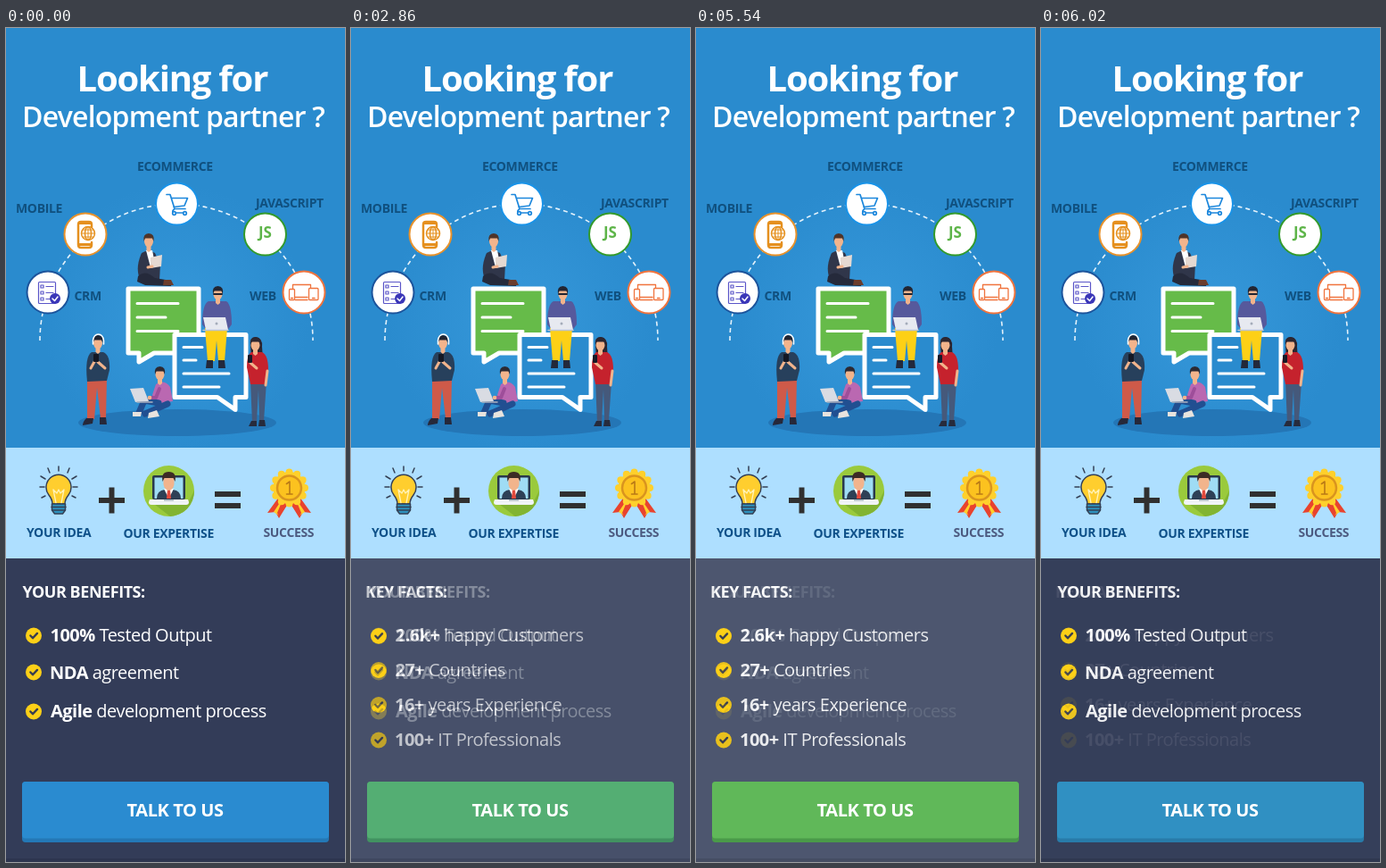
An HTML page that plays this animation: 380 by 934 pixels, repeating every 6080 ms.

```html
<!DOCTYPE html>
<html lang="en">
<head>
<meta charset="utf-8">
<title>Development partner</title>
<style>
  html, body { margin: 0; width: 100%; height: 100%; overflow: hidden; background: #2a8bce; }
  svg { display: block; width: 100vw; height: 100vh; font-family: "Open Sans", sans-serif; font-weight: 700; }
  .title { font-size: 40px; letter-spacing: -.03em; fill: #fff; }
  .subtitle { font-size: 32px; font-weight: 600; letter-spacing: -.025em; fill: #fff; }
  .label { font-size: 14px; letter-spacing: -.35px; fill: #10507f; }
  .sum { font-size: 14px; letter-spacing: -.35px; fill: #0f5189; }
  .heading { font-size: 18px; letter-spacing: -.45px; fill: #fff; }
  .item { font-size: 20px; font-weight: 400; letter-spacing: -.5px; fill: #fff; }
  .item tspan { font-weight: 700; }
  .button { font-size: 20px; letter-spacing: -.4px; fill: #fff; }
  .line { fill: none; stroke-linecap: round; stroke-linejoin: round; }
  .badge { fill: #fff; stroke-width: 2; }
  .skin { fill: #f2b48c; }
  .arm { stroke: #f2b48c; stroke-width: 3; }

  /* Crossfade in 60 ms steps of a tenth, both ways */
  #facts { animation: swap 6080ms infinite; }
  @keyframes swap {
    0% { opacity: 0; animation-timing-function: step-end; }
    41.1184% { opacity: .1; animation-timing-function: steps(9, end); }
    50% { opacity: 1; animation-timing-function: step-end; }
    91.1184% { opacity: .9; animation-timing-function: steps(9, end); }
    100% { opacity: 0; }
  }
</style>
</head>
<body>
<svg viewBox="0 0 380 934" preserveAspectRatio="none">
  <defs>
    <radialGradient id="glow" gradientUnits="userSpaceOnUse" cx="190" cy="325" r="150">
      <stop offset="0" stop-color="#3698da"/>
      <stop offset="1" stop-color="#2a8bce"/>
    </radialGradient>
    <g id="tick">
      <circle r="9" fill="#fdd017"/>
      <path class="line" d="M-3.6 0 -1 2.8 4-2.6" stroke="#3a3f50" stroke-width="2.4"/>
    </g>
    <g id="head">
      <path class="skin" d="M-2.5 3h5v7l-2.500 2-2.500-2Z"/>
      <ellipse class="skin" rx="5" ry="6.500"/>
      <path d="M-5.500 0Q-7-8.500 0-9 7-8.500 5.500 0L4-3.500H-4Z" fill="currentColor"/>
    </g>
    <g id="ribbon">
      <path d="M306 525 293 543 302 542 306 549 317 531Z" fill="#e8432e"/>
      <path d="M308 530 300 542 306 546 314 533Z" fill="#ffd02c"/>
      <path d="M309 531 304 543 306 547 316 533Z" fill="#e8432e"/>
    </g>
  </defs>

  <rect width="380" height="470" fill="url(#glow)"/>
  <text class="title" x="79.500" y="71">Looking for</text>
  <text class="subtitle" x="18" y="111">Development partner ?</text>

  <!-- Services -->
  <path d="M38 350A153 153 0 0 1 344 350" fill="none" stroke="#e4f2fb" stroke-width="1.6" stroke-dasharray="5 4"/>
  <g class="label">
    <text x="147" y="160">ECOMMERCE</text>
    <text x="11" y="207">MOBILE</text>
    <text x="280" y="201">JAVASCRIPT</text>
    <text x="76.500" y="305">CRM</text>
    <text x="273" y="305">WEB</text>
  </g>
  <g class="badge">
    <circle cx="47" cy="296" r="23.500" stroke="#1c549c"/>
    <circle cx="89" cy="231" r="23.500" stroke="#e8922c"/>
    <circle cx="191.500" cy="197" r="23.500" stroke="#1993e8"/>
    <circle cx="290.500" cy="231" r="23.500" stroke="#339a2c"/>
    <circle cx="334" cy="296" r="23.500" stroke="#f0743e"/>
  </g>
  <g class="line" stroke="#5a55c8" stroke-width="1.2">
    <rect x="36.500" y="284.500" width="19" height="24" rx="1"/>
    <path d="M39 288h3v3h-3zM39 295h3v3h-3zM39 302h3v3h-3zM45 289.500h8M45 296.500h8M45 303.500h4"/>
    <circle cx="55" cy="303" r="6" fill="#3a36b8" stroke="none"/>
    <path d="M52 303 54.500 305.500 58 301" stroke="#fff" stroke-width="1.5"/>
  </g>
  <g class="line" stroke="#e5901f" stroke-width="1.5">
    <path d="M96 223v-3q0-3-3-3H84q-3 0-3 3v23q0 3 3 3h9q3 0 3-3v-3" stroke-width="2.5"/>
    <path d="M82 218.500h13M82 242.500h13" stroke-width="3"/>
    <circle cx="92" cy="230" r="7.500" fill="#fff"/>
    <ellipse cx="92" cy="230" rx="3.500" ry="7.500"/>
    <path d="M84.500 230h15M92 222.500v15M86 226h12M86 234h12" stroke-width="1"/>
  </g>
  <g class="line" stroke="#1c87dc" stroke-width="1.7">
    <path d="M180 186.500h4l5 16h12M185.500 190.500h18l-3.500 8.500-12 1.500M189 202.500q-4 3-1 4.500h14"/>
    <circle cx="188.500" cy="207.500" r="1.800" fill="#fff"/>
    <circle cx="200.500" cy="207.500" r="1.800" fill="#fff"/>
  </g>
  <text x="283" y="235" font-size="17" fill="#5db448" letter-spacing="-.2">JS</text>
  <g class="line" stroke="#f0743e" stroke-width="1.3">
    <path d="M321.500 292v-4.500h20v4M324 301.500h14M324 304.500h14"/>
    <rect x="317.500" y="292.500" width="6" height="12" rx="1" fill="#fff"/>
    <rect x="339.500" y="291.500" width="10.500" height="13" rx="1" fill="#fff"/>
    <path d="M319.500 302.500h2M343.500 302.500h2.500"/>
  </g>

  <!-- Team -->
  <ellipse cx="192" cy="442" rx="111" ry="15" fill="#2476b6"/>
  <path d="M137 292h79v72h-50l-17 10v-10h-12Z" fill="#66bb49" stroke="#fff" stroke-width="5" stroke-linejoin="round"/>
  <path class="line" d="M147 308.500h46M147 324h32M147 339.500h46" stroke="#fff" stroke-width="3"/>
  <path d="M189 343.500h80v70h-12v14l-20-14h-48Z" fill="#2a8bce" stroke="#fff" stroke-width="5" stroke-linejoin="round"/>
  <path class="line" d="M199 357.500h21M199 372h14M199 387h51M199 402h40" stroke="#fff" stroke-width="3"/>

  <g>
    <path d="M152 252q7-5 15 0l6 13-1 17-21 1q-7-13 1-31Z" fill="#30364a"/>
    <path d="M157 249h7l3 15-5 4Z" fill="#fff"/>
    <path d="M148 278q8-8 19 2l12 2 7 3-1 4-29-1-9-4Z" fill="#252a3b"/>
    <path d="M177 282h8l3 6h-12Z" fill="#6b3d2d"/>
    <use href="#head" x="160" y="239" color="#4f3429"/>
    <path d="M162 257l13-3-1 13-12 2Z" fill="#e5d9d2"/>
    <path class="line arm" d="M159 268 164 267"/>
  </g>
  <g>
    <path d="M227 306h20q6 4 6 26l-6 8h-21l-6-8q0-23 7-26Z" fill="#56599c"/>
    <path d="M223 336h25l-3 37h-7l-2-23-2 23h-8Z" fill="#fdd016"/>
    <path d="M225 372h7v9h-8ZM238 372h7l1 9h-8Z" fill="#23293b"/>
    <use href="#head" x="237.500" y="298" color="#222532"/>
    <path class="line" d="M233 298h9" stroke="#222532" stroke-width="2"/>
    <path d="M221 324h25l3 14h-25Z" fill="#e7e9f0"/>
    <circle cx="236" cy="331" r="1.500" fill="#a4abb9"/>
    <path class="line" d="M221 338.500h28" stroke="#bcc3d0" stroke-width="1.500"/>
  </g>
  <g>
    <path d="M91 392h22l-1 45h-6l-4-34-3 35h-8Z" fill="#cf5a49"/>
    <path d="M90 437h8l-1 6-11 2q0-4 4-8ZM105 436h7l1 8h-8Z" fill="#26283a"/>
    <path d="M96 363h13q8 3 7 20l-3 12-22 1q-3-28 5-33Z" fill="#27405c"/>
    <use href="#head" x="103" y="353" color="#222532"/>
    <path class="line" d="M97.500 354v-4q1-7 6-7t6 7v4" stroke="#fff" stroke-width="1.500"/>
    <path class="line arm" d="M95 381 100 372M111 381 103 374"/>
    <rect x="98" y="365" width="6" height="9" rx="1" fill="#151824"/>
  </g>
  <g>
    <path d="M168 399q9-6 16 3l3 16-18 3-5-10Z" fill="#ba68b1"/>
    <path class="line" d="M171 420 155 417 149 431M181 421 156 432" stroke="#214f91" stroke-width="7"/>
    <path d="M142 430h10l-1 5h-9ZM160 431l9-3 3 7-13 2Z" fill="#e8e3de"/>
    <use href="#head" x="172.500" y="388" color="#2c2a33"/>
    <path class="line" d="M172 404 168 414 161 414" stroke="#9e4e9a" stroke-width="4"/>
    <path d="M139 404l15-1 6 15-15 1Z" fill="#d9dce3"/>
    <path class="line" d="M147 419h17" stroke="#aab1c0" stroke-width="1.500"/>
    <circle class="skin" cx="161" cy="414" r="2.300"/>
  </g>
  <g>
    <path d="M274 396h18l-3 44h-5l-1-35-2 37h-5Z" fill="#45597b"/>
    <path d="M275 440h6v6h-9ZM284 439h6l1 7h-8Z" fill="#272b3c"/>
    <path d="M274 356q-1-10 6-10 8 1 7 11l1 14h-13Z" fill="#2c2630"/>
    <path d="M275 363h12q7 3 7 20l-2 16h-18l-4-19q0-14 5-17Z" fill="#c5222d"/>
    <use href="#head" x="279.500" y="355" color="#2c2630"/>
    <path class="line arm" d="M274 375 281 381M293 384 291 400"/>
    <rect x="271" y="366" width="5" height="9" rx="1" fill="#171a28"/>
  </g>

  <!-- Formula -->
  <rect y="470" width="380" height="124" fill="#aedfff"/>
  <g class="line" stroke="#344055" stroke-width="1.500">
    <path d="M59 491v5M47 493l2 5M71 493l-2 5M39 502l5 3M79 502l-5 3M38 514h5M75 514h5M40 526l4-2M78 526l-4-2"/>
    <path d="M52 533q0-5-4-10a14 14 0 1 1 22 0q-4 5-4 10Z" fill="#ffce2e"/>
    <path d="M56 532 53 517 57 521 59 517 61 521 65 517 62 532" stroke="#fff3b8" stroke-width="1.300"/>
    <path d="M51.500 533h15v7l-3 4h-9l-3-4Z" fill="#2e91bd"/>
    <path d="M51 536.500h16M52 540h14"/>
  </g>
  <path d="M104 529h29M118.500 514.500v29" stroke="#303030" stroke-width="6"/>
  <path d="M234 522h29M234 535h29" stroke="#303030" stroke-width="6"/>

  <circle cx="182.500" cy="518.500" r="28.500" fill="#9aca3c"/>
  <path d="M204 532 211 518a28.500 28.500 0 0 1-27 29L166 533Z" fill="#82b432"/>
  <rect x="164" y="501" width="37" height="27" rx="2" fill="#29384c"/>
  <rect x="166.500" y="503.500" width="32" height="23.500" fill="#9fdcf4"/>
  <path d="M169 527q0-9 9-10h9q9 1 9 10Z" fill="#2e4056"/>
  <path d="M177 516h11l-5.500 11Z" fill="#fff"/>
  <path d="M181 517h3l1 10h-5Z" fill="#e34a3d"/>
  <path class="skin" d="M176.500 503h12v8q-1 6-6 7-5-1-6-7Z"/>
  <path d="M175.500 508q-2-11 7-11 9 0 7 11l-2-4h-10Z" fill="#3d2b25"/>
  <path d="M161 528h43l1 3q0 3-3 3h-39q-3 0-3-3Z" fill="#f1f4f6"/>
  <path d="M177 528h11v2h-11Z" fill="#bcc7cf"/>

  <use href="#ribbon"/>
  <use href="#ribbon" transform="matrix(-1 0 0 1 635 0)"/>
  <circle cx="317.500" cy="515" r="18" fill="#ffd02c"/>
  <circle class="line" cx="317.500" cy="515" r="17.500" stroke="#ffd02c" stroke-width="8" pathLength="12" stroke-dasharray="0 1"/>
  <circle cx="317.500" cy="515" r="13.500" fill="#fcc21f" stroke="#d9941f" stroke-width="2.500"/>
  <path class="line" d="M314.500 510.500 318 508v14M314.500 522h6.500" stroke="#b97a17" stroke-width="1.600"/>
  <g class="sum">
    <text x="23" y="570">YOUR IDEA</text>
    <text x="131.500" y="571">OUR EXPERTISE</text>
    <text x="288.500" y="570" fill="#4c5a80">SUCCESS</text>
  </g>

  <g id="benefits">
    <rect y="594" width="380" height="340" fill="#333c58"/>
    <text class="heading" x="18.500" y="638">YOUR BENEFITS:</text>
    <use href="#tick" x="31" y="680.500"/>
    <use href="#tick" x="31" y="721.500"/>
    <use href="#tick" x="31" y="765.500"/>
    <g class="item">
      <text x="49.500" y="687"><tspan>100%</tspan> Tested Output</text>
      <text x="49" y="729"><tspan>NDA</tspan> agreement</text>
      <text x="50" y="772"><tspan>Agile</tspan> development process</text>
    </g>
    <rect x="18" y="844" width="344" height="68" rx="4" fill="#2478b6"/>
    <rect x="18" y="844" width="344" height="63.500" rx="4" fill="#2a8bd0"/>
  </g>

  <g id="facts">
    <rect y="594" width="380" height="340" fill="#505a72"/>
    <text class="heading" x="16" y="638">KEY FACTS:</text>
    <use href="#tick" x="31" y="681"/>
    <use href="#tick" x="31" y="719"/>
    <use href="#tick" x="31" y="758"/>
    <use href="#tick" x="31" y="797.500"/>
    <g class="item">
      <text x="49.500" y="687"><tspan>2.6k+</tspan> happy Customers</text>
      <text x="49.500" y="726"><tspan>27+</tspan> Countries</text>
      <text x="49" y="765"><tspan>16+</tspan> years Experience</text>
      <text x="49" y="804"><tspan>100+</tspan> IT Professionals</text>
    </g>
    <rect x="18" y="844" width="344" height="68" rx="4" fill="#4f9e3d"/>
    <rect x="18" y="844" width="344" height="63.500" rx="4" fill="#67be4c"/>
  </g>
  <text class="button" x="135.500" y="883">TALK TO US</text>
  <rect y="930" width="380" height="4" fill="#000" opacity=".1"/>
</svg>
</body>
</html>
```
